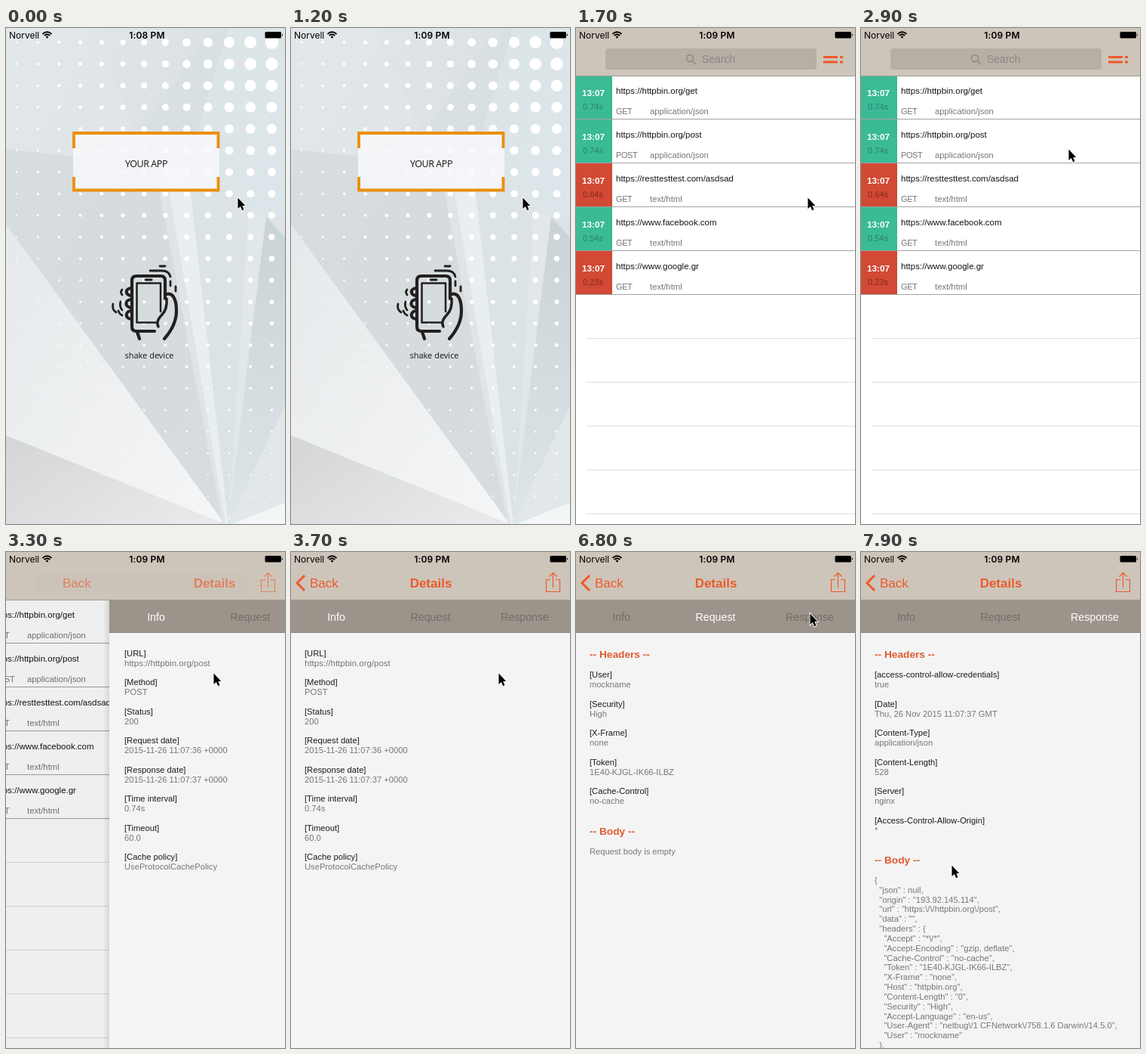
Recreate the animation shown at these times as an HTML page. Size 370 px wide and 656 px high, loop 8 s.

```html
<!DOCTYPE html>
<html lang="en">
<head>
<meta charset="utf-8">
<title>Network log demo</title>
<style>
  html, body { margin: 0; width: 100%; height: 100%; overflow: hidden; background: #fff; }
  svg { display: block; width: 370px; height: 656px; font-family: "Liberation Sans", Arial, sans-serif; }
  text { white-space: pre; }
  .status { font: 12px Inter, sans-serif; }
  .app { font-family: "Open Sans", sans-serif; fill: #151515; text-anchor: middle; }
  .mid { text-anchor: middle; }
  .line { fill: none; stroke: #231f20; stroke-linecap: round; stroke-linejoin: round; }
  .accent { fill: none; stroke: #ec5a2a; }
  .nav { font-size: 17px; fill: #ec5a2a; }
</style>
</head>
<body>
<svg viewBox="0 0 370 656">
  <defs>
    <linearGradient id="base" x1="0" y1="0" x2="1" y2="1">
      <stop offset="0" stop-color="#e3e8ea"/><stop offset=".45" stop-color="#dae0e3"/><stop offset="1" stop-color="#dfe6e9"/>
    </linearGradient>
    <linearGradient id="ray" x1="0" y1="0" x2="1" y2="1">
      <stop offset="0" stop-color="#e6e9eb"/><stop offset="1" stop-color="#f5f6f7"/>
    </linearGradient>
    <linearGradient id="floor" x1="0" y1="0" x2="1" y2=".6">
      <stop offset="0" stop-color="#d3d5d6"/><stop offset="1" stop-color="#e6e8e9"/>
    </linearGradient>
    <linearGradient id="dark" x1="0" y1="0" x2="0" y2="1">
      <stop offset="0" stop-color="#c9d3d6"/><stop offset="1" stop-color="#dee5e8"/>
    </linearGradient>
    <linearGradient id="edge">
      <stop offset="0" stop-color="#000" stop-opacity="0"/><stop offset="1" stop-color="#000" stop-opacity=".1"/>
    </linearGradient>
  </defs>

  <g id="home">
    <rect width="370" height="656" fill="url(#base)"/>
    <path d="M0 0H110L195 185L0 160Z" fill="#e4e8ea" opacity=".5"/>
    <path d="M0 160L100 171L203 185L290 656L0 260Z" fill="#d5dadc" opacity=".7"/>
    <path d="M183 130L262 15L295 0L240 180Z" fill="#d3dde1" opacity=".45"/>
    <path d="M295 0H370V250H345L240 180Z" fill="#dce6ea" opacity=".8"/>
    <path d="M0 260L290 656L0 539Z" fill="url(#ray)"/>
    <path d="M0 539L290 656H0Z" fill="url(#floor)"/>
    <path d="M198 185L240 175L295 656H288Z" fill="#e9eef0"/>
    <path d="M198 185L211 183L291 656H287Z" fill="#dfe5e7"/>
    <path d="M240 175L345 250L295 656Z" fill="#dce3e6"/>
    <path d="M345 250L325 400L295 656L322 240Z" fill="#e5ebed" opacity=".6"/>
    <path d="M345 250L370 277V500L295 656Z" fill="url(#dark)"/>
    <path d="M370 500V630L300 656H295Z" fill="#e2e8ea"/>
    <path d="M370 628V656H300Z" fill="#f3f6f7"/>
    <g id="dots" fill="#fff"></g>
    <rect x="89" y="138" width="194" height="78" fill="#f8f9fc" opacity=".86"/>
    <path d="M90 159V139H281.500V159M90 197V214.500H281.500V197" fill="none" stroke="#ea8f0c" stroke-width="3.800"/>
    <text class="app" x="186" y="183.5" font-size="12.5" letter-spacing="-.45">YOUR APP</text>
    <g class="line" stroke-width="4.200">
      <path d="M211 358V334Q211 328 205 328H173Q167 328 167 334V395Q167 401 173 401H197"/>
      <path d="M205 375V337.500H173.500V389.500H199" stroke-width="2.500"/>
      <path d="M185 333H193" stroke-width="3"/>
      <path d="M167 344C158 344 157 353 166 354M167 359C157 359 157 369 166 370M167 374C158 374 157 384 166 385"/>
      <path d="M213 358Q214 372 207 379Q198 388 202 395" stroke-width="3.500"/>
      <path d="M213 352C222 350 226 360 226 374C226 390 218 402 210 411"/>
      <path d="M174 402L177 411"/>
      <g stroke-width="2.800">
        <path d="M191 321H207Q216 321 218 329M204 315H211M218 335V341M225 342V348"/>
        <path d="M154 346Q151 349 154 353M152 362Q150 368 154 373M142 365Q140 372 146 376M149 374Q150 378 154 380"/>
      </g>
    </g>
    <text class="app" x="190" y="437" font-size="11">shake device</text>
  </g>

  <g id="modal">
    <rect width="370" height="656" fill="#fff"/>
    <g id="list"></g>
    <rect id="dim" y="63" width="370" height="593"/>
    <g id="panel">
      <rect x="-11" y="63" width="9" height="593" fill="url(#edge)"/>
      <rect x="-2" y="63" width="372" height="593" fill="#f4f4f4"/>
      <rect x="-2" y="63" width="372" height="44" fill="#9c938b"/>
      <path d="M-2 106.500H370" stroke="#8b837c"/>
      <g id="tabs" class="mid" font-size="14.2"></g>
      <g id="pages"></g>
    </g>
    <rect width="370" height="63.500" fill="#cec5ba"/>
    <path d="M0 63.500H370" stroke="#a09992"/>
    <g id="searchBar">
      <rect x="39" y="27" width="280" height="28" rx="4" fill="#b7aea5"/>
      <g fill="none" stroke="#8d8781" stroke-width="1.400"><circle cx="151" cy="40" r="4.500"/><path d="M154.500 43.500L159 48"/></g>
      <text x="167" y="46" font-size="14" fill="#8d8781">Search</text>
      <path class="accent" d="M328 38.500H347M328 45H354M350 38.500H354" stroke-width="2.800" stroke-dasharray="19 3"/>
    </g>
    <g id="detailBar">
      <path id="chevron" class="accent" d="M18 31L8 41L18 51" stroke-width="3"/>
      <text id="back" class="nav" x="25" y="47">Back</text>
      <text id="title" class="nav mid" x="185.500" y="47" font-weight="700">Details</text>
      <path class="accent" d="M344 36.500H338.500V52.500H356.500V36.500H351M347.500 47V27.500M342.500 32.500L347.500 27.500L352.500 32.500" stroke-width="1.200"/>
    </g>
  </g>

  <g class="status">
    <text x="4" y="13.500">Norvell</text>
    <g fill="none" stroke="#000" stroke-width="1.800">
      <path d="M48.500 8Q54.500 2.500 60.500 8M50.700 10.200Q54.500 6.800 58.300 10.200"/>
      <circle cx="54.500" cy="12" r=".6"/>
    </g>
    <text id="clock" class="mid" x="187" y="13.500" font-weight="600" letter-spacing=".15"></text>
    <rect x="343.500" y="5" width="21.500" height="8.500" rx="1.500"/>
    <path d="M366 7.500Q368 9.200 366 11Z"/>
  </g>
  <path id="cursor" d="M.5 .5V15L3.900 12L6.200 17.200L8.500 16.200L6.300 11.100H10.300Z" stroke="#fff" stroke-width="1.800" paint-order="stroke"/>
</svg>

<script>
const $ = id => document.getElementById(id);

function add(parent, tag, attrs, content) {
  const el = document.createElementNS('http://www.w3.org/2000/svg', tag);
  for (const k in attrs) el.setAttribute(k, attrs[k]);
  if (content !== undefined) el.textContent = content;
  parent.appendChild(el);
  return el;
}
const label = (parent, x, y, size, fill, str, more) =>
  add(parent, 'text', { x, y, 'font-size': size, fill, ...more }, str);

// Halftone dots shrink away from the top right corner.
for (let row = 0; row < 23; row++) {
  for (let col = 0; col < 13; col++) {
    const cx = 14 + col * 28.2, cy = 19 + row * 28.6;
    const d = Math.hypot(353 - cx, (cy - 19) * 0.65);
    const r = 8.8 * Math.exp(-Math.pow(d / 210, 1.2));
    if (r > 0.6) add($('dots'), 'circle', { cx, cy, r: r.toFixed(2) });
  }
}

const calls = [
  ['https://httpbin.org/get', 'GET', 'application/json', '0.74s', 1],
  ['https://httpbin.org/post', 'POST', 'application/json', '0.74s', 1],
  ['https://resttesttest.com/asdsad', 'GET', 'text/html', '0.64s', 0],
  ['https://www.facebook.com', 'GET', 'text/html', '0.54s', 1],
  ['https://www.google.gr', 'GET', 'text/html', '0.23s', 0]
];
for (let i = 0; i < 10; i++) {
  const y = 63 + i * 58, list = $('list'), call = calls[i];
  add(list, 'path', { d: `M${call ? 0 : 14} ${y + 57.5}H370`, stroke: call ? '#a3a3a3' : '#dedede' });
  if (!call) continue;
  const [url, method, type, took, ok] = call;
  add(list, 'rect', { y, width: 48, height: 57, fill: ok ? '#3bba96' : '#d24935' });
  label(list, 23, y + 27, 11.8, '#fff', '13:07', { class: 'mid', 'font-weight': 700 });
  label(list, 22.5, y + 45, 11, ok ? '#27816a' : '#83291d', took, { class: 'mid' });
  label(list, 53, y + 24, 11.5, '#151515', url);
  label(list, 53, y + 50.5, 11, '#777', method, { 'letter-spacing': -0.4 });
  label(list, 98, y + 50.5, 11.3, '#777', type);
}

const tabs = ['Info', 'Request', 'Response'].map((name, i) => label($('tabs'), 60 + i * 125, 91, 14.2, '#fff', name));

const pages = tabs.map(() => add($('pages'), 'g', {}));
const dark = '#1c1c1c', grey = '#777', step = 38.5;

function pairs(page, top, rows) {
  rows.forEach(([key, value], i) => {
    const y = top + i * step;
    label(page, 18, y, 11.2, dark, `[${key}]`);
    label(page, 18, y + 13, value.startsWith('http') ? 11.5 : 11.2, grey, value);
  });
}
const heading = (page, y, name) =>
  label(page, 18, y, 13.7, '#e05a30', `-- ${name} --`, { 'font-weight': 700 });

pairs(pages[0], 137.8, [
  ['URL', 'https://httpbin.org/post'],
  ['Method', 'POST'],
  ['Status', '200'],
  ['Request date', '2015-11-26 11:07:36 +0000'],
  ['Response date', '2015-11-26 11:07:37 +0000'],
  ['Time interval', '0.74s'],
  ['Timeout', '60.0'],
  ['Cache policy', 'UseProtocolCachePolicy']
]);

heading(pages[1], 140, 'Headers');
pairs(pages[1], 166, [
  ['User', 'mockname'],
  ['Security', 'High'],
  ['X-Frame', 'none'],
  ['Token', '1E40-KJGL-IK66-ILBZ'],
  ['Cache-Control', 'no-cache']
]);
heading(pages[1], 373.5, 'Body');
label(pages[1], 18, 399.5, 11.2, grey, 'Request body is empty');

heading(pages[2], 140, 'Headers');
pairs(pages[2], 166, [
  ['access-control-allow-credentials', 'true'],
  ['Date', 'Thu, 26 Nov 2015 11:07:37 GMT'],
  ['Content-Type', 'application/json'],
  ['Content-Length', '528'],
  ['Server', 'nginx'],
  ['Access-Control-Allow-Origin', '*']
]);
heading(pages[2], 412, 'Body');
String.raw`{
 "json" : null,
 "origin" : "193.92.145.114",
 "url" : "https:\/\/httpbin.org\/post",
 "data" : "",
 "headers" : {
  "Accept" : "*\/*",
  "Accept-Encoding" : "gzip, deflate",
  "Cache-Control" : "no-cache",
  "Token" : "1E40-KJGL-IK66-ILBZ",
  "X-Frame" : "none",
  "Host" : "httpbin.org",
  "Content-Length" : "0",
  "Security" : "High",
  "Accept-Language" : "en-us",
  "User-Agent" : "netbug\/1 CFNetwork\/758.1.6 Darwin\/14.5.0",
  "User" : "mockname"
 },`.split('\n').forEach((line, i) => {
  const str = line.trimStart();
  label(pages[2], 18 + (line.length - str.length) * 6.2, 438 + i * 12.83, 11.2, grey, str);
});

// Remaining distance (1 to 0) of a critically damped spring.
const spring = ms => ms <= 0 ? 1 : (1 + ms / 50) * Math.exp(-ms / 50);

const home = [307, 224];
const moves = [
  [2000, 2700, 275, 160],
  [3700, 4600, 214, 81],
  [5500, 6200, 310, 81],
  [7300, 7900, 120, 414]
];
function pointer(t) {
  let [x, y] = home;
  for (const [from, to, tx, ty] of moves) {
    const p = Math.min(1, Math.max(0, (t - from) / (to - from)));
    const e = p * p * (3 - 2 * p);
    x += (tx - x) * e;
    y += (ty - y) * e;
  }
  return [x, y];
}

// Whole pixels keep hairlines and text crisp while sliding.
const shift = (id, x, y) => $(id).setAttribute('transform', `translate(${Math.round(x)} ${Math.round(y)})`);
const fade = (id, value) => $(id).setAttribute('opacity', value.toFixed(3));

function draw(t) {
  $('clock').textContent = t < 1100 ? '1:08 PM' : '1:09 PM';
  shift('modal', 0, t < 1400 ? 656 : 656 * spring(t - 1219));

  const left = spring(t - 3194), done = 1 - left;
  shift('panel', left === 1 ? 400 : 370 * left, 0);
  shift('list', -112 * done, 0);
  fade('dim', 0.1 * done);
  fade('searchBar', left === 1 ? 1 : left ** 3);
  fade('detailBar', done);
  fade('chevron', done ** 6);
  shift('back', 134 * left, 0);
  shift('title', 244 * left, 0);

  const tab = t < 5100 ? 0 : t < 7000 ? 1 : 2;
  tabs.forEach((el, i) => {
    el.setAttribute('fill', i === tab ? '#fff' : '#756d67');
    pages[i].setAttribute('display', i === tab ? 'inline' : 'none');
  });
  shift('cursor', ...pointer(t));
}

const start = performance.now();
function tick() {
  const t = (performance.now() - start) % 8000;
  draw(Math.floor(t / 100) * 100);
  requestAnimationFrame(tick);
}
tick();
</script>
</body>
</html>
```
